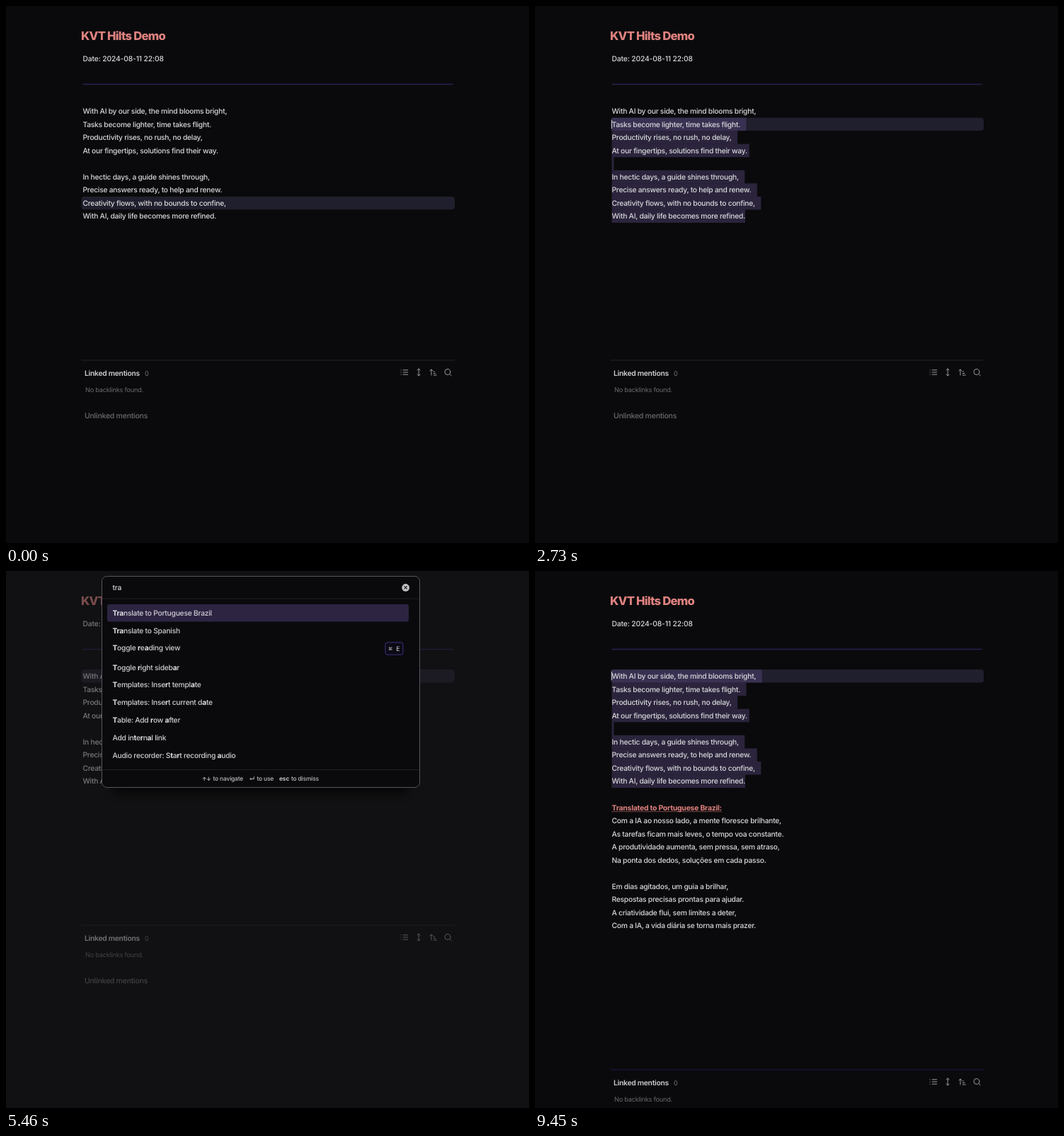
These frames come from a looping animation (739 by 758 pixels, 9870 ms). An HTML page with a canvas:

```html
<!DOCTYPE html>
<html lang="en">
<head>
<meta charset="utf-8">
<title>Note translation</title>
<style>
  html, body { margin: 0; width: 100%; height: 100%; overflow: hidden; background: #0a0a0c; }
  canvas { display: block; width: 739px; height: 758px; }
</style>
</head>
<body>
<canvas id="stage"></canvas>
<script>
const W = 739, H = 758, LOOP = 9870;
const LINE = 18.55, TOP = 139.1, LEFT = 108.5;
const SANS = 'Inter, "Noto Sans", "DejaVu Sans", sans-serif';
const MONO = '"DejaVu Sans Mono", "DejaVu Sans", monospace';
const BG = '#0a0a0c', TEXT = '#d9d9dc', PINK = '#df827f';

const canvas = document.getElementById('stage');
const ctx = canvas.getContext('2d');
const dpr = window.devicePixelRatio || 1;
canvas.width = W * dpr;
canvas.height = H * dpr;

const poem = [
  'With AI by our side, the mind blooms bright,',
  'Tasks become lighter, time takes flight.',
  'Productivity rises, no rush, no delay,',
  'At our fingertips, solutions find their way.',
  '',
  'In hectic days, a guide shines through,',
  'Precise answers ready, to help and renew.',
  'Creativity flows, with no bounds to confine,',
  'With AI, daily life becomes more refined.'
];
const LAST = poem.length - 1;
// Lines that end in a two-space break, which widens their selection.
const hasBreak = i => ![3, 4, LAST].includes(i);

const translation = [
  'Com a IA ao nosso lado, a mente floresce brilhante,',
  'As tarefas ficam mais leves, o tempo voa constante.',
  'A produtividade aumenta, sem pressa, sem atraso,',
  'Na ponta dos dedos, soluções em cada passo.',
  '',
  'Em dias agitados, um guia a brilhar,',
  'Respostas precisas prontas para ajudar.',
  'A criatividade flui, sem limites a deter,',
  'Com a IA, a vida diária se torna mais prazer.'
];

const recent = [
  'Toggle bullet list', 'Toggle bold', 'Set as heading 3', 'Set as heading 2',
  'Set as heading 1', 'Split right', 'Split down', 'Toggle highlight',
  'Toggle blockquote', 'Add alias', 'Add cursor above', 'Add cursor below',
  'Add embed', 'Add file property', 'Add internal link', 'Add tag',
  'Audio recorder: Start recording audio',
  'Backlinks: Open backlinks for the current note', 'Backlinks: Show backlinks',
  'Backlinks: Toggle backlinks in document', 'Bookmarks: Bookmark all tabs...',
  'Bookmarks: Bookmark block under cursor...', 'Bookmarks: Bookmark current search...'
];
const startingT = [
  'Toggle pin', 'Toggle bold', 'Toggle code', 'Toggle italic', 'Toggle ribbon',
  'Toggle comment', 'Toggle heading', 'Toggle highlight', 'Toggle blockquote',
  'Toggle spellcheck', 'Toggle bullet list', 'Toggle inline math',
  'Toggle left sidebar', 'Toggle reading view', 'Toggle stacked tabs',
  'Tags view: Show tags', 'Toggle numbered list', 'Toggle right sidebar',
  'Toggle strikethrough', 'Toggle checkbox status', 'Templates: Insert template',
  'Templates: Insert current date', 'Templates: Insert current time'
];
const translate = ['Translate to Portuguese Brazil', 'Translate to Spanish'];
const tables = [
  'Add row after', 'Add row before', 'Add column after', 'Align center', 'Align right',
  'Delete row', 'Duplicate row', 'Move row up', 'Move row down', 'Sort by column'
].map(s => 'Table: ' + s);
const commands = [...new Set([...translate, ...startingT, ...tables, ...recent])];
const keys = {
  'Toggle bold': '⌘ B', 'Toggle italic': '⌘ I', 'Toggle comment': '⌘ /',
  'Toggle reading view': '⌘ E', 'Tags view: Show tags': '⌥ T',
  'Toggle checkbox status': '⌘ L', 'Add file property': '⌘ ;'
};
const pinned = new Set(recent.slice(0, 8));

// Positions of the query letters in a name, or null when it does not match.
function match(name, query) {
  const low = name.toLowerCase(), hits = [];
  let from = 0;
  for (const c of query) {
    const at = low.indexOf(c, from);
    if (at < 0) return null;
    hits.push(at);
    from = at + 1;
  }
  return hits;
}

function results(query) {
  if (!query) return recent;
  if (query === 't') return startingT;
  return commands.filter(name => match(name, query));
}

function setFont(size, weight, track = -0.025, family = SANS) {
  ctx.font = `${weight} ${size}px ${family}`;
  ctx.letterSpacing = `${size * track}px`;
}
const bodyFont = () => setFont(10.3, 500);

function text(str, x, y, color = TEXT) {
  ctx.fillStyle = color;
  ctx.fillText(str, x, y);
  return x + ctx.measureText(str).width;
}

function rect(x, y, w, h, color) {
  ctx.fillStyle = color;
  ctx.fillRect(x, y, w, h);
}

function rounded(x, y, w, h, r, fill, stroke) {
  ctx.beginPath();
  ctx.roundRect(x, y, w, h, r);
  if (fill) { ctx.fillStyle = fill; ctx.fill(); }
  if (stroke) { ctx.strokeStyle = stroke; ctx.lineWidth = 1; ctx.stroke(); }
}

function path(d, x, y, color, width = 1) {
  ctx.save();
  ctx.translate(x, y);
  ctx.strokeStyle = color;
  ctx.lineWidth = width;
  ctx.lineCap = ctx.lineJoin = 'round';
  ctx.stroke(new Path2D(d));
  ctx.restore();
}

const baseline = i => TOP + i * LINE + 12.9;
const lineWidth = str => { bodyFont(); return ctx.measureText(str).width; };

function drawLines(lines, first) {
  bodyFont();
  lines.forEach((line, i) => text(line, LEFT, baseline(first + i)));
}

function drawSelection(from) {
  for (let i = from; i <= LAST; i++) {
    const tail = i === LAST ? 0 : hasBreak(i) ? 8.5 : 3;
    rect(LEFT, TOP + i * LINE, lineWidth(poem[i]) + tail, LINE, 'rgba(98,80,140,.38)');
  }
}

function drawBacklinks(dy, rule) {
  ctx.save();
  ctx.translate(0, dy);
  rect(106.5, 499.5, 527.5, 1, rule);
  setFont(10.3, 600);
  text('Linked mentions', 111, 522.4, '#cfcfd3');
  setFont(9.2, 400);
  text('0', 196, 522.4, '#727276');
  text('No backlinks found.', 112, 545.1, '#6b6b6f');
  setFont(10.55, 500);
  text('Unlinked mentions', 111, 582.4, '#6b6b6f');
  const c = '#9a9a9e';
  path('M-1.5 -3.2H5M-1.5 0H5M-1.5 3.2H5M-4.6 -3.2h.1M-4.6 0h.1M-4.6 3.2h.1', 562.7, 517, c);
  path('M0 -5V5M-2 -3L0 -5L2 -3M-2 3L0 5L2 3', 583.2, 517, c);
  path('M-2.5 4V-4M-4.5 -2L-2.5 -4L-.5 -2M.8 -1H2M.8 1.5H3.4M.8 4H4.8', 603.5, 517, c);
  path('M3.6 -.5A4 4 0 1 1 -4.4 -.5A4 4 0 1 1 3.6 -.5M2.6 2.5L5 4.8', 624.4, 517, c);
  ctx.restore();
}

function drawNote(s) {
  rect(0, 0, W, H, BG);
  setFont(16.7, 800, -0.045);
  text('KVT Hilts Demo', 106, 48.4, PINK);
  setFont(10.3, 500, -0.014);
  text('Date: 2024-08-11 22:08', LEFT, 78);
  rect(LEFT, 109.8, 523, 1.4, '#2b2256');
  rounded(106.5, TOP + s.line * LINE, 527.5, 18.4, 4, '#201f2d');
  if (s.selected !== null) drawSelection(s.selected);
  drawLines(poem, 0);
  if (s.caret !== null) {
    const x = LEFT - 0.5 + lineWidth(s.caret);
    rect(Math.round(x), Math.round(TOP + s.line * LINE + 3), 1, 12, '#d0d0d4');
  }
  if (s.translated) {
    setFont(10.48, 700);
    const y = baseline(10), end = text('Translated to Portuguese Brazil:', LEFT, y, PINK);
    for (let x = LEFT; x < end; x += 2) rect(x, y + 1.6, 1, 1, PINK);
    drawLines(translation, 11);
  }
  drawBacklinks(s.translated ? 204 : 0, s.translated ? '#21174c' : '#242428');
}

function drawChip(label, right, y) {
  rounded(right - 25.5, y + 4.2, 25, 17.3, 3, '#0c0a14', '#3f2f86');
  setFont(8.8, 500, 0, MONO);
  ctx.textAlign = 'center';
  text(label, right - 13, y + 15.9, '#cfcfd3');
  ctx.textAlign = 'left';
}

function drawName(name, hits, y) {
  let x = 150.5;
  [...name].reduce((runs, c, i) => {
    const bold = hits.includes(i), run = runs[runs.length - 1];
    if (run && run.bold === bold) run.str += c;
    else runs.push({ bold, str: c });
    return runs;
  }, []).forEach(run => {
    setFont(10.3, run.bold ? 700 : 500);
    x = text(run.str, x, y, run.bold ? '#e4e4e7' : '#cfcfd3');
  });
}

function drawPalette(query, caretOn, alpha) {
  const names = results(query);
  const rowHeight = name => keys[name] ? 27.1 : 24.85;
  const total = names.reduce((sum, name) => sum + rowHeight(name), 0);
  const bottom = Math.min(629.5, Math.round(47 + total + 7) + 0.5);
  const full = bottom === 629.5;

  ctx.save();
  ctx.globalAlpha = alpha;
  rect(0, 0, W, H, 'rgba(24,24,27,.5)');
  // The shadow shows only below the box, so it is cast by a narrower shape.
  ctx.shadowColor = 'rgba(0,0,0,.55)';
  ctx.shadowBlur = 12 * dpr;
  ctx.shadowOffsetY = 10 * dpr;
  rounded(151, 30, 418, bottom - 5, 7, BG);
  ctx.shadowColor = 'transparent';
  rounded(135.5, 7.5, 449, bottom + 17.5, 7, BG, '#56565b');
  rect(136, 38.5, 448, 1, '#1f1f23');

  setFont(10.3, 500);
  const end = query ? text(query, 150.5, 27, '#d6d6d9') : 150.5;
  if (!query) text('Select a command...', 150.5, 27, '#77777b');
  if (caretOn) rect(Math.round(end - 0.3), 17, 1, 12, '#d6d6d9');
  ctx.beginPath();
  ctx.arc(564.7, 23.4, 5.3, 0, 7);
  ctx.fillStyle = '#c4c4c8';
  ctx.fill();
  path('M-1.8 -1.8L1.8 1.8M1.8 -1.8L-1.8 1.8', 564.7, 23.4, BG, 1.1);

  ctx.save();
  ctx.beginPath();
  ctx.rect(136, 39, 449, bottom - 39);
  ctx.clip();
  if (full) rounded(577, 39, 8, query === 'tr' ? 205 : 137, 4, '#2d2545');
  rounded(143, 47, 426, 24.6, 3, '#2d2442');
  let y = 47;
  names.forEach((name, i) => {
    const pin = pinned.has(name) || (!query && i < 9);
    drawName(name, match(name, query) || [], y + 15.7);
    if (pin) {
      path('M-2.2 -4H2.2M-1.4 -4V-.8L-3.4 1.6H3.4L1.4 -.8V-4M0 1.6V4.6', 553.5, y + 12.3, '#97979b', 0.9);
    }
    if (keys[name]) drawChip(keys[name], pin ? 541 : 561.5, y);
    y += rowHeight(name);
  });
  ctx.restore();

  rect(136, bottom - 0.5, 448, 1, '#1f1f23');
  const fy = bottom + 15.2, hint = '#bcbcc0';
  [['↑↓', 277, 'to navigate', 292.5, 7.2], ['↵', 343.5, 'to use', 354.5, 8], ['esc', 386, 'to dismiss', 403, 8.5]]
    .forEach(([key, kx, label, lx, size]) => {
      setFont(size, 700);
      text(key, kx, fy, hint);
      setFont(8.5, 500);
      text(label, lx, fy, hint);
    });
  ctx.restore();
}

// Value of the last [time, value] step that has been reached.
const step = (t, steps) => steps.reduce((v, [at, next]) => t >= at ? next : v, null);

const paletteAlpha = t => step(t, [
  [0, 0], [4340, 0.2], [4410, 0.55], [4480, 0.85], [4550, 1], [6020, 0.6], [6090, 0.22], [6160, 0]
]);
const queryAt = t => step(t, [[0, ''], [4760, 't'], [4830, 'tr'], [4970, 'tra']]);

function selectionStart(t) {
  if (t < 1960 || (t >= 4340 && t < 6020)) return null;
  if (t >= 3150) return 0;
  if (t >= 2730) return 1;
  return Math.max(2, LAST - Math.floor((t - 1960) / 105));
}

// Text left of the caret, or null while it is hidden.
const caretAt = t => step(t, [
  [980, 'Creativity flows, '], [1540, null], [1820, poem[LAST]], [1960, ''], [3850, null],
  [6370, ''], [7000, null], [7630, ''], [8820, null], [9450, '']
]);

function draw(t) {
  const selected = selectionStart(t), alpha = paletteAlpha(t);
  ctx.setTransform(dpr, 0, 0, dpr, 0, 0);
  ctx.textRendering = 'geometricPrecision';
  drawNote({
    line: t < 1820 ? 7 : t < 1960 ? LAST : selected ?? 0,
    selected,
    caret: caretAt(t),
    translated: t >= 8190
  });
  if (alpha) drawPalette(queryAt(t), t < 5460, alpha);
}

const start = performance.now();
function frame(now) {
  draw(Math.max(0, now - start) % LOOP);
  requestAnimationFrame(frame);
}
draw(0);
requestAnimationFrame(frame);
</script>
</body>
</html>
```
